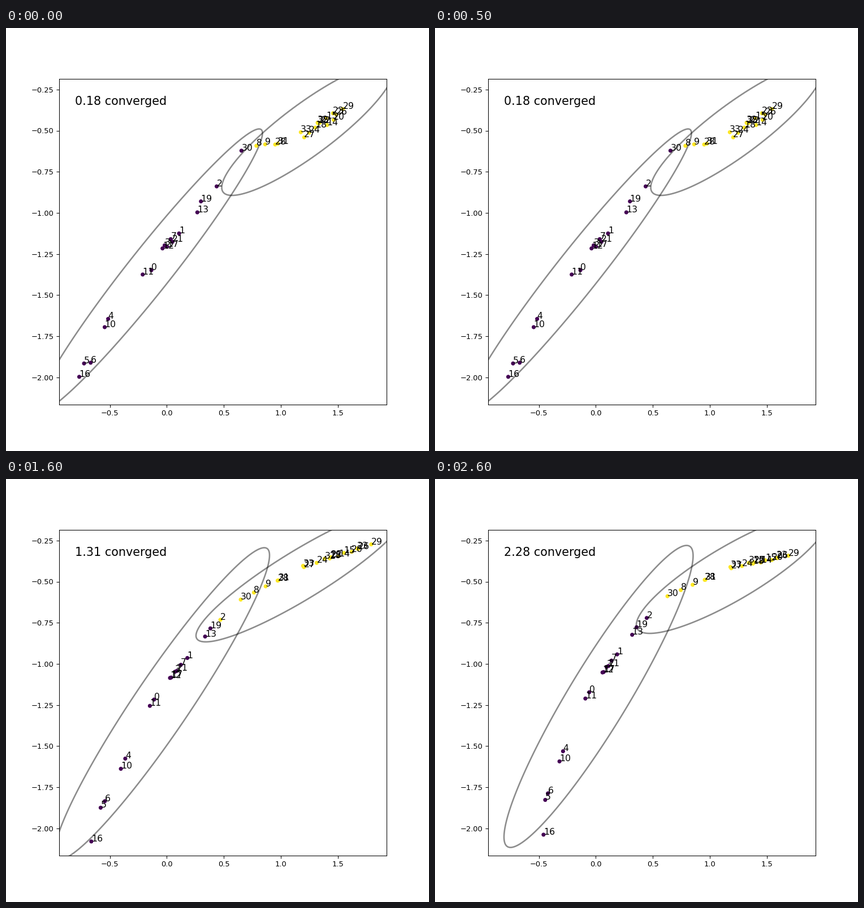
Recreate the animation shown at these times as a matplotlib script. Size 748 px wide and 748 px high, loop 3000 ms.

```python
import numpy as np
import matplotlib.pyplot as plt
from matplotlib.animation import FuncAnimation
from matplotlib.patches import Polygon

SIZE, INCHES = 748, 8
PURPLE, YELLOW = "#440154", "#fde725"

# Where each node sits along the band of points: one anchor every 10 units.
PLACE = np.array([30, 36, 43, 34, 21, 9, 11, 35, 52, 54, 19, 29, 33, 39, 65, 66, 0,
                  33, 64, 40, 67, 34, 64, 68, 62, 64, 68, 60, 56, 70, 50, 56, 63, 60])


def to_data(x, y):
    """Stage pixels (y down) to axis units."""
    x, y = np.asarray(x, float), np.asarray(y, float)
    return np.column_stack([(x - 284.4) / 201.6, -0.25 - (y - 108.8) / 290.8])


def ellipse(cx, cy, a, b, r):
    """Outline with half extents a, b and correlation r."""
    t = np.linspace(0, 2 * np.pi, 240, endpoint=False)
    return to_data(cx + a * np.cos(t), cy - b * np.cos(t + np.arccos(r)))


def step(score, anchors, spread, cut, *shapes):
    """Lay the nodes along the anchors; those from place `cut` on are yellow."""
    x, y = np.transpose(anchors)
    knots = 10 * np.arange(len(x))
    jitter = np.random.default_rng(4).uniform(-spread, spread, (2, len(PLACE)))
    points = to_data(np.interp(PLACE, knots, x) + jitter[0],
                     np.interp(PLACE, knots, y) + jitter[1])
    colors = np.where(PLACE >= cut, YELLOW, PURPLE)
    return score, points, colors, [ellipse(*s) for s in shapes]


STEPS = [
    step("0.18", [(122, 613), (142, 596), (171, 524), (250, 432),
                  (343, 306), (416, 220), (520, 186), (600, 145)], 8, 51,
         (253.8, 429, 199.7, 250.5, 0.970), (533.5, 179, 152, 117, 0.88)),
    step("1.31", [(149, 640), (170, 576), (205, 506), (260, 391),
                  (361, 264), (415, 214), (525, 154), (647, 116)], 2, 43,
         (276, 397.2, 190, 275.7, 0.951), (522, 169.1, 186, 118.9, 0.9075)),
    step("2.28", [(190, 628), (196, 562), (221, 493), (271, 378),
                  (356, 262), (411, 208), (522, 156), (626, 136)], 2, 50,
         (289.2, 384.5, 167.2, 267, 0.931), (525, 166.2, 169, 106.8, 0.859)),
]

fig, ax = plt.subplots(figsize=(INCHES, INCHES), dpi=SIZE / INCHES)
fig.subplots_adjust(left=0.125, right=0.9, bottom=0.11, top=0.88)
(x0, y0), (x1, y1) = to_data([93.5, 673.2], [665.72, 89.76])

_, points, colors, outlines = STEPS[0]
dots = ax.scatter(*points.T, s=20, c=colors)
rings = [ax.add_patch(Polygon(o, fill=False, ec="black", lw=2, alpha=0.45))
         for o in outlines]
labels = [ax.text(x, y, str(i), fontsize=12) for i, (x, y) in enumerate(points)]
title = ax.text(0.05, 0.92, "", fontsize=16, transform=ax.transAxes)
ax.set(xlim=(x0, x1), ylim=(y0, y1))


def draw(i):
    score, points, colors, outlines = STEPS[i % len(STEPS)]
    dots.set_offsets(points)
    dots.set_color(colors)
    for ring, outline in zip(rings, outlines):
        ring.set_xy(outline)
    for label, point in zip(labels, points):
        label.set_position(point)
    title.set_text(f"{score} converged")
    return [dots, *rings, *labels, title]


anim = FuncAnimation(fig, draw, frames=len(STEPS), interval=1000,
                     repeat=True, repeat_delay=0)
plt.show()
```
